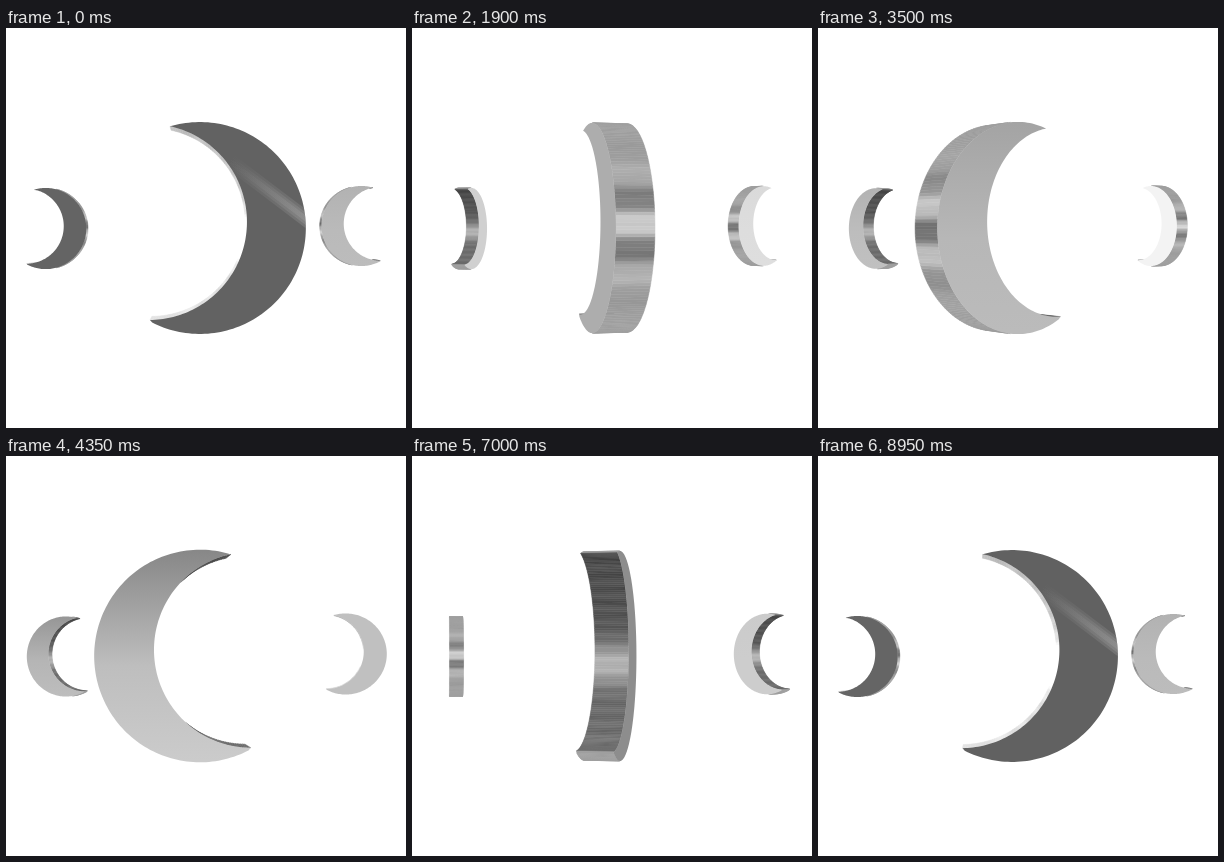
Write an HTML page with a canvas that moves like this. It is 400x400 px and loops after 9000 ms.

```html
<!DOCTYPE html>
<html>
<head>
<meta charset="utf-8">
<title>Triple moon</title>
<style>
html, body { margin: 0; width: 100%; height: 100%; overflow: hidden; background: #fff; }
canvas { display: block; width: 100vw; height: 100vh; }
</style>
</head>
<body>
<canvas id="stage" width="400" height="400"></canvas>
<script>
const ctx = document.getElementById('stage').getContext('2d');
const LOOP = 9000, STEP = 50, CAMERA = 900, MID_X = 193.5, MID_Y = 200;
const TAU = 2 * Math.PI;
const rad = deg => deg * Math.PI / 180;
const mix = (a, b, k) => a + (b - a) * k;
const ease = p => p * p * (3 - 2 * p);

function gray(v) {
  const g = Math.round(Math.max(0, Math.min(255, v)));
  return `rgb(${g},${g},${g})`;
}

function arc(cx, cy, r, from, to, n, inner) {
  return Array.from({ length: n }, (_, i) => {
    const a = rad(mix(from, to, i / n));
    return { x: cx + r * Math.cos(a), y: cy + r * Math.sin(a), inner };
  });
}

// Unit crescent: outer arc downwards, then inner arc back up.
const crescent = [
  ...arc(0, 0, 1, -106.4, 118.5, 130, false),
  ...arc(-0.481, -0.057, 0.925, 89.4, -77.7, 110, true)
];

// x, y: pivot; cx: crescent centre from the pivot; front, back: depth of the two faces.
// a, b: tones of the faces seen head-on; edge: tone at a glancing angle;
// lean: difference between the two halves of a turn; tilt: extra light at the bottom of b.
const moons = [
  { x: -142.5, y: 0.5, r: 40, cx: -9, front: 13.4, back: 0,
    a: 100, b: 170, edge: 230, lean: 15, tilt: 20, turn: p => -TAU * p },
  { x: 0, y: 0, r: 104, cx: 0.4, front: 16.5, back: -19.5, streak: true,
    a: 98, b: 168, edge: 160, lean: 17, tilt: 34, turn: p => TAU * p },
  { x: 154, y: -2, r: 40, cx: -8, front: 13.4, back: 0,
    a: 188, b: 183, edge: 245, lean: 15, tilt: 5, turn: p => TAU * (0.5 - ease(p)) }
];

function project(moon, pt, z, c, s) {
  const lx = moon.cx + pt.x * moon.r;
  const depth = lx * s + z * c;
  const k = CAMERA / (CAMERA - depth);
  return {
    x: MID_X + (moon.x + lx * c - z * s) * k,
    y: MID_Y + (moon.y + pt.y * moon.r) * k,
    depth
  };
}

// Positive when the outline runs clockwise, so the surface faces the viewer.
function area(pts) {
  return pts.reduce((sum, p, i) => {
    const q = pts[(i + 1) % pts.length];
    return sum + p.x * q.y - q.x * p.y;
  }, 0);
}

function trace(pts) {
  ctx.beginPath();
  pts.forEach(p => ctx.lineTo(p.x, p.y));
  ctx.closePath();
}

// Reflections on the walls; v runs from -1 at the top to 1 at the bottom.
function outerTone(v, turn) {
  const bands = -50 * Math.cos(13.5 * v + 2 * turn - 5.3) + 10 * Math.sin(45 * v);
  return 158 + bands * Math.exp(-((v / 0.45) ** 2));
}

function innerTone(v, turn) {
  const glow = 120 * Math.max(0, Math.cos(turn)) ** 8;
  const shine = 85 * Math.exp(-(((v - 0.08) / 0.22) ** 2));
  return 92 + 22 * v + shine + 7 * Math.sin(50 * v) + glow;
}

function drawWalls(a, b, turn) {
  const quads = [];
  crescent.forEach((pt, i) => {
    const j = (i + 1) % crescent.length;
    const pts = [a[i], b[i], b[j], a[j]];
    if (area(pts) <= 0) return;
    const v = (pt.y + crescent[j].y) / 2;
    const tone = (pt.inner ? innerTone : outerTone)(v, turn);
    quads.push({ pts, tone, depth: pts.reduce((d, p) => d + p.depth, 0) });
  });
  quads.sort((p, q) => p.depth - q.depth);
  ctx.lineWidth = 0.5;
  for (const q of quads) {
    trace(q.pts);
    ctx.fillStyle = ctx.strokeStyle = gray(q.tone);
    ctx.fill();
    ctx.stroke();
  }
}

function drawFace(moon, pts, headOn, turn) {
  const s = Math.sin(turn);
  const tone = mix(headOn, moon.edge, s * s) + moon.lean * s;
  const tilt = moon.tilt * Math.max(0, -Math.cos(turn)) ** 4;
  const y = MID_Y + moon.y;
  const fill = ctx.createLinearGradient(0, y - moon.r, 0, y + moon.r);
  fill.addColorStop(0, gray(tone - tilt));
  fill.addColorStop(0.55, gray(tone + tilt * 0.6));
  fill.addColorStop(1, gray(tone + tilt));
  trace(pts);
  ctx.fillStyle = fill;
  ctx.fill();
}

// Soft diagonal highlight while the large moon faces the viewer.
function drawStreak(pts, turn) {
  const power = Math.max(0, Math.cos(turn)) ** 40;
  ctx.save();
  trace(pts);
  ctx.clip();
  const glow = ctx.createLinearGradient(222, 134, 300, 194);
  glow.addColorStop(0, 'rgba(190,190,190,0)');
  glow.addColorStop(1, `rgba(190,190,190,${0.2 * power})`);
  ctx.strokeStyle = glow;
  for (const width of [15, 10, 5]) {
    ctx.lineWidth = width;
    ctx.beginPath();
    ctx.moveTo(222, 132);
    ctx.quadraticCurveTo(262, 162, 304, 194);
    ctx.stroke();
  }
  ctx.restore();
}

function drawMoon(moon, p) {
  const turn = moon.turn(p);
  const c = Math.cos(turn), s = Math.sin(turn);
  const a = crescent.map(pt => project(moon, pt, moon.front, c, s));
  const b = crescent.map(pt => project(moon, pt, moon.back, c, s));
  drawWalls(a, b, turn);
  if (area(a) > 0) {
    drawFace(moon, a, moon.a, turn);
    if (moon.streak) drawStreak(a, turn);
  }
  if (area(b) < 0) drawFace(moon, b, moon.b, turn);
}

function frame() {
  const t = Math.floor((performance.now() % LOOP) / STEP) * STEP;
  ctx.fillStyle = '#fff';
  ctx.fillRect(0, 0, 400, 400);
  moons.forEach(moon => drawMoon(moon, t / LOOP));
  requestAnimationFrame(frame);
}
frame();
</script>
</body>
</html>
```
